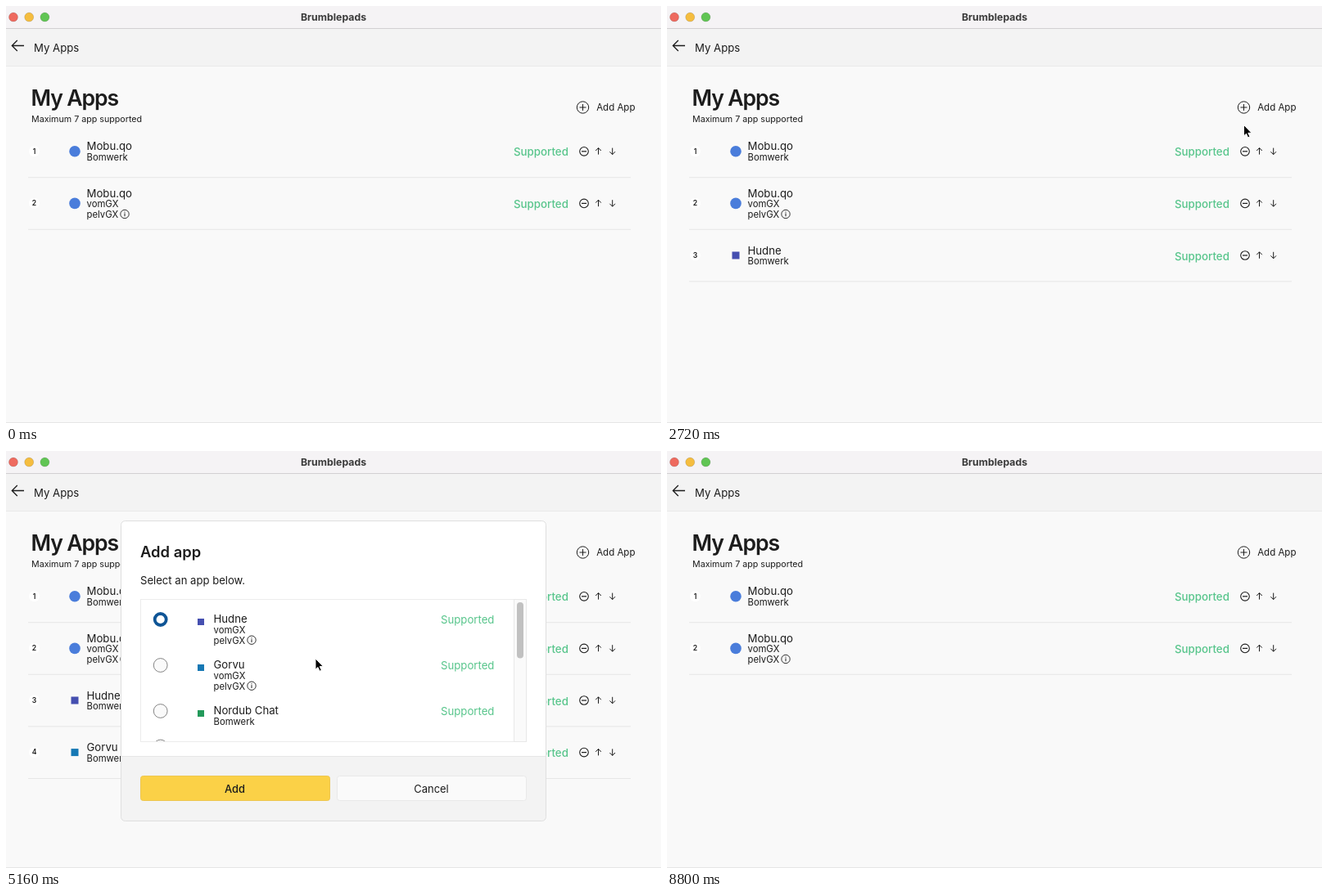
These frames come from a looping animation (800 by 510 pixels, 9.04 s). An HTML page:

```html
<!DOCTYPE html>
<html lang="en">
<head>
<meta charset="utf-8">
<title>My Apps</title>
<style>
  html, body { margin: 0; width: 100%; height: 100%; overflow: hidden; background: #f9f9f9; }
  svg { display: block; width: 100%; height: 100%; font-family: Inter, "Open Sans", sans-serif; }
</style>
</head>
<body>
<svg viewBox="0 0 800 510">
  <defs><clipPath id="list"><rect x="165" y="182" width="455" height="173"/></clipPath></defs>
  <g id="page"></g>
  <g id="rows"></g>
  <g id="dialog"></g>
  <path id="cursor" d="M0 0V13.4L3 10.7 5.1 15.4 7.4 14.4 5.3 9.8H9.5Z" fill="#000" stroke="#fff"/>
</svg>
<script>
const LOOP = 9040, STEP = 40;
const GREEN = '#57c58b', INK = '#1c1c1c';
const $ = id => document.getElementById(id);

// Drawing helpers
const text = (s, x, y, size, fill = INK, weight = 400, more = '') =>
  `<text x="${x}" y="${y}" font-size="${size}" fill="${fill}" font-weight="${weight}" ${more}>${s}</text>`;
const rect = (x, y, w, h, fill, more = '') =>
  `<rect x="${x}" y="${y}" width="${w}" height="${h}" fill="${fill}" ${more}/>`;
const circle = (x, y, r, fill, more = '') =>
  `<circle cx="${x}" cy="${y}" r="${r}" fill="${fill}" ${more}/>`;
const line = (d, width = 1, stroke = INK) =>
  `<path d="${d}" fill="none" stroke="${stroke}" stroke-width="${width}"/>`;
const ring = (x, y, r, width = 1) => circle(x, y, r, 'none', `stroke="${INK}" stroke-width="${width}"`);

// Apps, each for one or two platforms
const DESK = ['Bomwerk'], TABLET = ['vomGX', 'pelvGX'];
const call = { name: 'Mobu.qo', color: '#4a7ddb', round: true };
const team = { name: 'Hudne', color: '#454fb0' };
const voice = { name: 'Gorvu', color: '#1678b4' };
const chat = { name: 'Nordub Chat', color: '#23995a' };
const catalog = [team, voice, chat].flatMap(app => [DESK, TABLET].map(os => ({ app, os })));

const added = [
  { app: call, os: DESK, from: 0, to: LOOP },
  { app: call, os: TABLET, from: 0, to: LOOP },
  { app: team, os: DESK, from: 2160, to: 6960 },
  { app: voice, os: DESK, from: 4120, to: 7360 },
  { app: chat, os: DESK, from: 5840, to: 7680 }
];
const rowsAt = t => added.filter(r => t >= r.from && t < r.to);

const dialogs = [
  { open: 1160, close: 2160, pick: 0, at: 0 },
  { open: 2880, close: 4120, pick: 1, at: 3440 },
  { open: 4880, close: 5840, pick: 2, at: 5360 }
];

function label({ app, os }, x, y) {
  let out = text(app.name, x, y, 13.2);
  os.forEach((s, i) => out += text(s, x, y + 12.4 + i * 12.7, 11.3));
  if (os.length > 1) {
    const cx = x + 46.5, cy = y + 20.8;
    out += ring(cx, cy, 5.2, .9) + line(`M${cx} ${cy - 1}v3.8M${cx} ${cy - 3}v1.1`);
  }
  return out;
}

function icon(app, x, y, size) {
  return app.round ? circle(x, y, 6.8, app.color)
    : rect(x - size / 2, y - size / 2, size, size, app.color);
}

function drawPage() {
  const lights = ['#ee6a5f', '#f5bd3f', '#61c554'];
  return rect(0, 0, 800, 27, '#f5f3f5') + rect(0, 27, 800, 1, '#d2d0d2') +
    lights.map((c, i) => circle(9 + 19.2 * i, 13.6, 5.5, c, 'stroke="#000" stroke-opacity=".13"')).join('') +
    text('Brumblepads', 400, 17.7, 12.3, '#3a3a3a', 700, 'text-anchor="middle"') +
    rect(0, 28, 800, 45, '#f3f3f3') + rect(0, 73, 800, 1, '#e9e9e9') +
    line('M22 48.5H7.5M13.8 42 7.3 48.5 13.8 55', 1.3) +
    text('My Apps', 34, 55.6, 13.2) +
    text('My Apps', 30.5, 121.5, 26.6, INK, 600, 'letter-spacing="-1.1"') +
    text('Maximum 7 app supported', 31, 142, 10.7) +
    ring(704.5, 124, 7.2) + line('M700.5 124h8M704.5 120v8') +
    text('Add App', 721.2, 128.4, 11.5) +
    rect(0, 509, 800, 1, '#e6e6e6');
}

function drawRow(row, i) {
  const y = 177.6 + 63.6 * i;
  return circle(34.5, y, 6.5, '#fff') +
    text(i + 1, 34.5, y + 3, 8.6, INK, 600, 'text-anchor="middle"') +
    icon(row.app, 84, y + .2, 9) +
    label(row, 98.5, y - 1.2 - (row.os.length - 1) * 6.3) +
    text('Supported', 620, y + 5.8, 13.3, GREEN, 500) +
    ring(706, y + .2, 5.3, 1.1) + line(`M703 ${y + .2}h6`, 1.2) +
    line(`M723.5 ${y + 4}v-8M720.2 ${y - .6}l3.3-3.4 3.3 3.4`) +
    line(`M740.7 ${y - 4}v8M737.4 ${y + .6}l3.3 3.4 3.3-3.4`) +
    rect(27, y + 31.6, 736, 1, '#e7e7e7');
}

function drawDialog(d, t) {
  const owned = rowsAt(d.open);
  const options = catalog.filter(o => !owned.some(r => r.app === o.app && r.os === o.os));
  const picked = t >= d.at ? d.pick : 0;
  let y = 206, list = '';
  options.forEach((o, i) => {
    list += (i === picked
      ? circle(188.7, y, 7, '#fff', 'stroke="#0f5596" stroke-width="3.8"')
      : circle(188.7, y, 8.4, '#fafafa', 'stroke="#858585"')) +
      icon(o.app, 238, y + 3, 8) + label(o, 253.5, y + 4.4) +
      text('Supported', 531, y + 5, 13.2, GREEN);
    y += o.os.length > 1 ? 56 : 43.5;
  });
  const button = (s, x, fill, edge) =>
    rect(x + .5, 397.5, 231, 30, fill, `rx="3" stroke="${edge}"`) +
    text(s, x + 115.5, 418.3, 12.9, INK, s === 'Add' ? 500 : 400, 'text-anchor="middle"');
  return rect(140.5, 85.5, 519, 367, '#fff', 'rx="5"') +
    '<path d="M140.5 373.5h519v74a5 5 0 0 1-5 5h-509a5 5 0 0 1-5-5z" fill="#f3f3f3"/>' +
    line('M141 373.5h518', 1, '#e6e6e6') +
    rect(140.5, 85.5, 519, 367, 'none', 'rx="5" stroke="#dfdfdf"') +
    text('Add app', 164, 130, 18.4, INK, 600) +
    text('Select an app below.', 164, 162.7, 13.1) +
    rect(164.5, 181.5, 471, 174, 'none', 'stroke="#ececec"') +
    `<g clip-path="url(#list)">${list}</g>` +
    rect(620.5, 181.5, 15, 174, '#fafafa', 'stroke="#e8e8e8"') +
    rect(624, 185, 8, 68.5, '#c1c1c1', 'rx="4"') +
    button('Add', 164, '#fbd147', '#edc650') +
    button('Cancel', 404, '#fafafa', '#e9e9e9');
}

// Pointer path: time, x, y
const path = [
  [840, 757, 195], [1120, 744, 121.5], [1400, 744, 121.5], [1960, 278, 414], [2200, 278, 414],
  [2720, 704.5, 145.5], [2840, 722, 127], [2960, 722, 127], [3400, 190, 264], [3640, 190, 264],
  [4040, 276, 414], [4160, 276, 414], [4320, 586.5, 322.5], [4680, 724, 132], [4920, 724, 132],
  [5320, 190, 320], [5440, 190, 320], [5760, 275.5, 414], [5960, 275.5, 414],
  [6640, 690, 316], [6920, 705.5, 304.5], [7160, 705.5, 304.5], [7200, 706.5, 305.5],
  [7960, 706.5, 305.5], [8160, 812, 307]
];

// Smooth curve through the points, at rest where the pointer waits
function slope(i, k) {
  const a = path[i - 1], p = path[i], b = path[i + 1];
  if (!a || !b || a[k] === p[k] || b[k] === p[k]) return 0;
  return (b[k] - a[k]) / (b[0] - a[0]);
}
function pointer(t) {
  const i = path.findIndex(p => p[0] > t) - 1;
  if (i < 0) return null;
  const a = path[i], b = path[i + 1], span = b[0] - a[0], u = (t - a[0]) / span;
  return [1, 2].map(k => {
    const ease = u * u * (3 - 2 * u);
    return a[k] + (b[k] - a[k]) * ease +
      span * u * (1 - u) * ((1 - u) * slope(i, k) - u * slope(i + 1, k));
  });
}

const cache = {};
function fill(id, markup) {
  if (cache[id] !== markup) $(id).innerHTML = cache[id] = markup;
}

function draw(now) {
  const t = Math.floor(now % LOOP / STEP) * STEP;
  fill('rows', rowsAt(t).map(drawRow).join(''));
  const d = dialogs.find(d => t >= d.open && t < d.close + 80);
  fill('dialog', d ? drawDialog(d, t) : '');
  if (d) $('dialog').setAttribute('opacity',
    Math.min(1, (t - d.open + STEP) / 120, (d.close + 80 - t) / 80));
  const p = pointer(t);
  $('cursor').setAttribute('visibility', p ? 'visible' : 'hidden');
  if (p) $('cursor').setAttribute('transform', `translate(${p})`);
}

fill('page', drawPage());
const start = performance.now();
function tick() {
  draw(performance.now() - start);
  requestAnimationFrame(tick);
}
tick();
</script>
</body>
</html>
```
